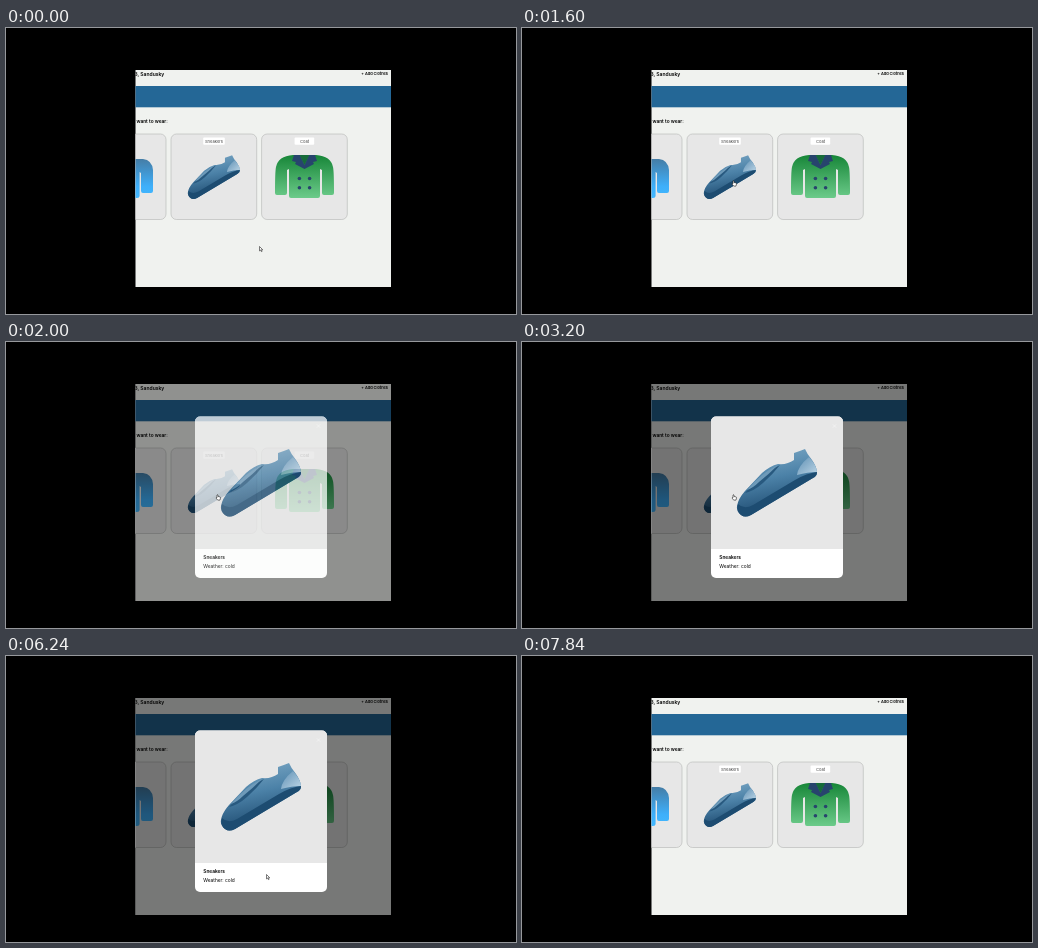
An HTML page that plays this animation: 510 by 286 pixels, repeating every 7920 ms.

```html
<!DOCTYPE html>
<html lang="en">
<head>
<meta charset="utf-8">
<style>
  html, body { margin: 0; width: 100%; height: 100%; overflow: hidden; background: #000; }
  svg { display: block; width: 510px; height: 286px; }
  text { font: 4.8px Inter, Arial, sans-serif; fill: #000; }
  .bold { font-weight: 600; }
  .card { fill: #e7e7e7; stroke: #b4b5b4; stroke-width: .6; }
  .tag { fill: #fff; }
  .label { font-size: 4.1px; fill: #444; text-anchor: middle; }
  .cursor { fill: #fff; stroke: #222; stroke-width: .6; stroke-linejoin: round; }
</style>
</head>
<body>
<svg viewBox="0 0 510 286">
  <defs>
    <clipPath id="screen"><rect x="129.5" y="42" width="255.5" height="217"/></clipPath>
    <linearGradient id="upper" x1="0" y1="0" x2=".25" y2="1">
      <stop offset="0" stop-color="#82adc9"/><stop offset=".5" stop-color="#4c82a8"/><stop offset="1" stop-color="#1d4a6f"/>
    </linearGradient>
    <linearGradient id="heel" x1="0" y1="0" x2="1" y2="1">
      <stop offset="0" stop-color="#5f90b4"/><stop offset="1" stop-color="#bcd5e6"/>
    </linearGradient>
    <linearGradient id="green" gradientUnits="userSpaceOnUse" x1="0" y1="127" x2="0" y2="170">
      <stop offset="0" stop-color="#178638"/><stop offset="1" stop-color="#6ccb8a"/>
    </linearGradient>
    <linearGradient id="blue" gradientUnits="userSpaceOnUse" x1="0" y1="131" x2="0" y2="170">
      <stop offset="0" stop-color="#457da6"/><stop offset=".7" stop-color="#3eaffa"/><stop offset="1" stop-color="#43b8ff"/>
    </linearGradient>
    <g id="shoe">
      <path fill="url(#upper)" d="M272 111Q278 109 283 107Q285 112 290 118Q295 125 295 131Q295 134 291 136L229 173Q223 176 219 173Q214 169 215 164Q216 157 223 149L240 131Q248 124 256 122Q265 123 272 118Z"/>
      <path fill="#28597f" d="M223 151Q238 132 258 123Q251 132 241 141Q232 149 223 151Z"/>
      <path fill="#6e9ab9" d="M225 148Q239 131 256 123Q247 132 237 140Q231 146 225 148Z"/>
      <path fill="url(#heel)" d="M275 133Q276 124 287 115Q295 124 295 130Q286 130 275 133Z"/>
      <path fill="#1d4c71" d="M216 162Q222 168 231 163L273 138Q285 131 295 130Q295 134 291 136L229 173Q223 176 219 173Q214 169 216 162Z"/>
    </g>
  </defs>

  <g clip-path="url(#screen)">
    <rect x="129" y="42" width="256" height="217" fill="#f0f2ef"/>
    <text class="bold" x="158.3" y="47.6" text-anchor="end" style="font-size:5px">23, Sandusky</text>
    <text class="bold" x="382" y="47" text-anchor="end" style="font-size:3.9px">+ Add Clothes</text>
    <rect x="129" y="58" width="256" height="21.3" fill="#246796"/>
    <text class="bold" x="161.8" y="95" text-anchor="end">want to wear:</text>

    <rect class="card" x="74.5" y="106" width="85.5" height="85.5" rx="5.5"/>
    <path fill="url(#blue)" d="M120 131H137Q146 132 147 142V163Q147 165 145 165H137Q135 165 135 163V145L133.6 144V168Q133.6 170 131 170H120Z"/>

    <rect class="card" x="165" y="106" width="85.7" height="85.5" rx="5.5"/>
    <use href="#shoe" transform="translate(42.15 57.6) scale(.65)"/>
    <rect class="tag" x="197.2" y="109.5" width="21.6" height="7.3" rx="1"/>
    <text class="label" x="208" y="114.5">Sneakers</text>

    <rect class="card" x="255.6" y="106" width="85.7" height="85.5" rx="5.5"/>
    <g fill="url(#green)">
      <path d="M287 127H310Q325 128 327 139Q328 143 328 165Q328 167 326 167H318Q316 167 316 165V142L314 141V168Q314 170 312 170H285Q283 170 283 168V141L281 142V165Q281 167 279 167H271Q269 167 269 165Q269 143 270 139Q272 128 287 127Z"/>
    </g>
    <path fill="#27446d" d="M288 127L286 133L290 134L289 136L298.5 141L308 136L307 134L311 133L309 127L303 127L298.5 137L294 127Z"/>
    <path fill="#176b3a" d="M294 127H303L298.5 137Z"/>
    <g fill="#27446d">
      <circle cx="293.4" cy="150.5" r="1.8"/><circle cx="303.6" cy="150.5" r="1.8"/>
      <circle cx="293.4" cy="159.7" r="1.8"/><circle cx="303.6" cy="159.7" r="1.8"/>
    </g>
    <rect class="tag" x="288.6" y="109.5" width="19.6" height="7.3" rx="1"/>
    <text class="label" x="298.5" y="114.5">Coat</text>

    <g id="modal">
      <rect x="129" y="42" width="256" height="217" fill="#000" opacity=".5"/>
      <rect x="189" y="74.5" width="132" height="161.5" rx="5" fill="#fff"/>
      <path fill="#e7e7e7" d="M189 207V79.5a5 5 0 0 1 5-5H316a5 5 0 0 1 5 5V207Z"/>
      <use href="#shoe"/>
      <path d="M311 82.5l3 3m0-3l-3 3" stroke="#f7f7f7" stroke-width=".7"/>
      <text class="bold" x="197.3" y="216.5">Sneakers</text>
      <text x="197.3" y="225.7">Weather: cold</text>
    </g>

    <path id="arrow" class="cursor" d="M0 0V4.4L1.1 3.5L1.9 5.1L2.6 4.8L1.9 3.2H3.2Z"/>
    <path id="hand" class="cursor" d="M1 .5Q1.5 -.2 2 .5V2L4 2.4Q4.6 2.6 4.5 3.4L4 5.6H1.7L0 3.5Q.2 2.7 1 3.2Z"/>
  </g>
</svg>
<script>
  const LOOP = 7920, STEP = 80, FADE = 400;
  const OPEN = 1680, CLOSE = 7200;
  const path = [ // time, x, y
    [0, 253.5, 218.5], [80, 253.5, 218.5], [640, 221, 167.5], [800, 216, 160.5], [1200, 210, 152.5],
    [3600, 210, 152.5], [4000, 220, 182], [4700, 243, 216], [5200, 260.5, 218.5],
    [6320, 260.5, 218.5], [7040, 314, 84.5], [LOOP, 314, 84.5]
  ];
  const get = id => document.getElementById(id);
  const modal = get('modal'), arrow = get('arrow'), hand = get('hand');
  const clamp = v => Math.max(0, Math.min(1, v));

  function position(t) {
    const i = path.findIndex(key => key[0] > t);
    const [t0, x0, y0] = path[i - 1], [t1, x1, y1] = path[i];
    const k = (t - t0) / (t1 - t0);
    return [x0 + (x1 - x0) * k, y0 + (y1 - y0) * k];
  }

  function draw(now) {
    const t = Math.floor(now % LOOP / STEP) * STEP;
    const [x, y] = position(t);
    const overCard = t <= 3600 && y < 191;
    const overClose = t >= 6960 && t < CLOSE + FADE;
    const pointing = overCard || overClose;
    const visible = t < 7840;

    modal.setAttribute('opacity', clamp((t - OPEN) / FADE) - clamp((t - CLOSE) / FADE));
    for (const shape of [arrow, hand]) shape.setAttribute('transform', `translate(${x} ${y})`);
    arrow.style.display = visible && !pointing ? '' : 'none';
    hand.style.display = visible && pointing ? '' : 'none';
  }

  function tick() {
    draw(performance.now());
    requestAnimationFrame(tick);
  }
  tick();
</script>
</body>
</html>
```
